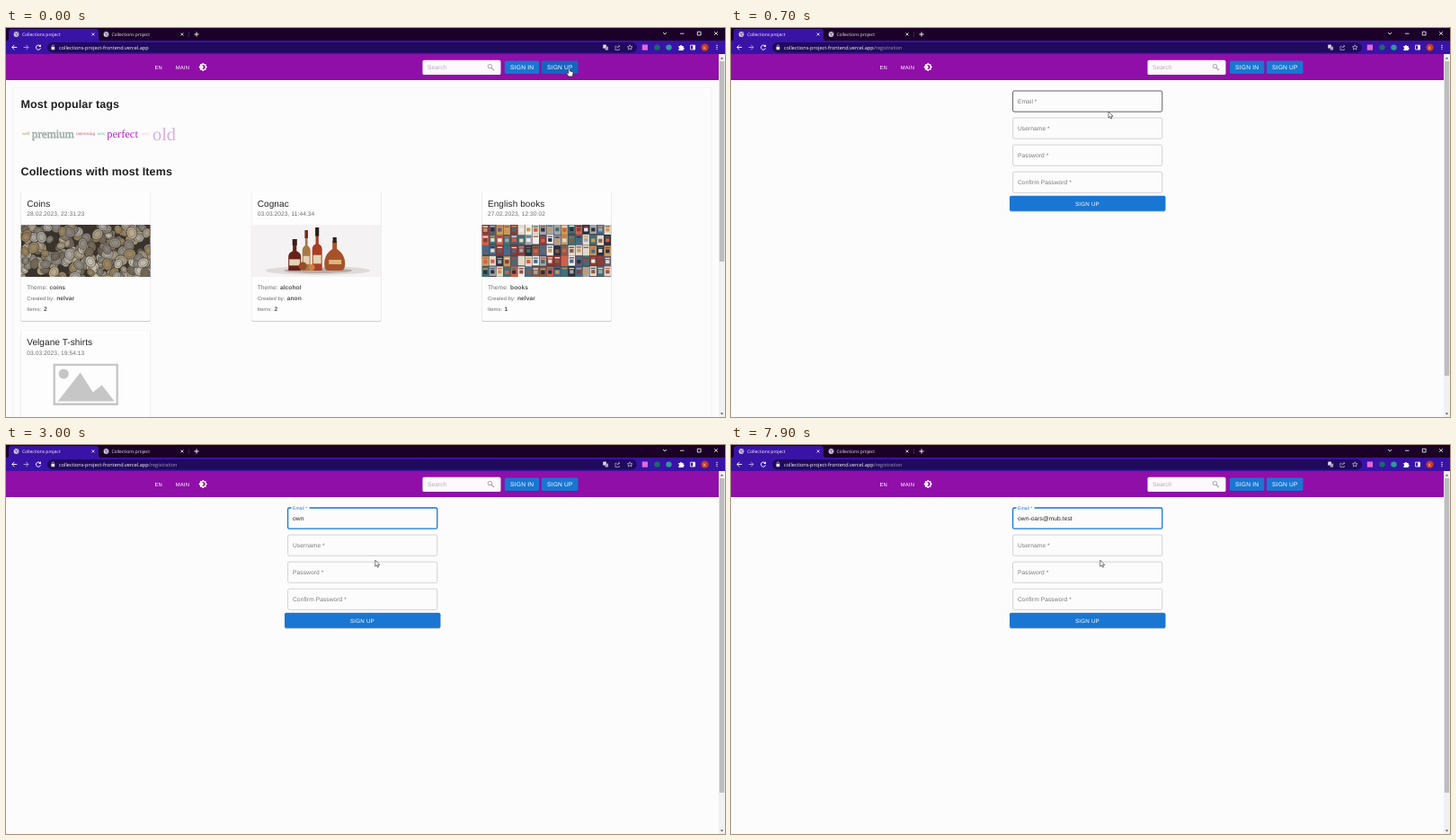
These frames come from a looping animation (800x433 px, 8000 ms). An HTML page:

```html
<!DOCTYPE html>
<html lang="en">
<head>
<meta charset="utf-8">
<title>Collections project</title>
<style>
html, body { margin: 0; width: 100%; height: 100%; overflow: hidden; background: #fdfcfd; }
svg { display: block; width: 100vw; height: 100vh; }
text { font-family: "Liberation Sans", Arial, sans-serif; white-space: pre; text-rendering: geometricPrecision; letter-spacing: .0094em; }
.ui { font-family: "Open Sans", "Noto Sans", sans-serif; letter-spacing: 0; }
.btn { letter-spacing: .0286em; fill: #fff; }
.head { font-weight: 700; fill: #1f1f1f; }
.tag { font-family: "Liberation Serif", Times, serif; letter-spacing: 0; }
.b { font-weight: 700; }
</style>
</head>
<body>
<svg id="stage" viewBox="0 0 800 433" preserveAspectRatio="none"></svg>
<script>
const LOOP = 8000, STEP = 100;
const ADDRESS = 'own-oars@mub.test';
const BLUE = '#1976d2', DARK_BLUE = '#1565c0';

let seed = 7;
const rnd = () => (seed = (seed * 16807) % 2147483647) / 2147483647;
const pick = list => list[Math.floor(rnd() * list.length)];
const times = (n, fn) => Array.from({ length: n }, (_, i) => fn(i)).join('');

const rect = (x, y, w, h, fill, more = '') =>
  `<rect x="${x}" y="${y}" width="${w}" height="${h}" fill="${fill}" ${more}/>`;
const circle = (x, y, r, fill, more = '') =>
  `<circle cx="${x}" cy="${y}" r="${r}" fill="${fill}" ${more}/>`;
const path = (d, fill, more = '') => `<path d="${d}" fill="${fill}" ${more}/>`;
const line = (d, color = '#fff', w = .8, more = '') =>
  path(d, 'none', `stroke="${color}" stroke-width="${w}" ${more}`);
const text = (s, x, y, size, fill, cls = '', more = '') =>
  `<text x="${x}" y="${y}" font-size="${size}" fill="${fill}" class="${cls}" ${more}>${s}</text>`;
const group = (id, body) => `<g id="${id}">${body}</g>`;

// Browser window
function globe(x) {
  return circle(x, 7, 2.9, '#d8d4e4') +
    line(`M${x - 2} 5.6l1.6 .4l.6 1.4l-1.2 .6M${x + .6} 4.6l.3 1l1.4 .7M${x} 9.2l1-1l1 .1`, '#3c2a6c', .7);
}

function cross(x, y, r) {
  return line(`M${x - r} ${y - r}l${2 * r} ${2 * r}m0 ${-2 * r}l${-2 * r} ${2 * r}`, '#fff', .75);
}

function browser() {
  const strip = rect(0, 0, 800, 14.5, '#1b0028') +
    path('M0 14.5Q3 14.5 3 11V4Q3 1 6 1H100Q103 1 103 4V11Q103 14.5 106 14.5Z', '#3913a6') +
    globe(11.5) + text('Collections project', 18, 9, 4.95, '#fff', 'ui') + cross(97, 7, 1.5) +
    globe(111.5) + text('Collections project', 117.5, 9, 4.95, '#f0eaf4', 'ui') + cross(196, 7, 1.5) +
    line('M203.5 4v6', '#5a4668', .5) +
    line('M209.4 7h5.2M212 4.4v5.2', '#fff', .9) +
    line('M731 5l2 2l2-2M750 6.2h4.5M769.3 4.2h3.8v3.8h-3.8z') + cross(790, 6, 1.9);
  const bar = rect(0, 14, 800, 15, '#3913a6') +
    rect(46, 16, 656, 11.4, '#200a5c', 'rx="5.7"') +
    line('M12.2 21.5H6.8m2.5-2.6l-2.6 2.6l2.6 2.6', '#fff', .9) +
    line('M19.6 21.5h5.2m-2.5-2.6l2.6 2.6l-2.6 2.6', '#b9a8e4', .9) +
    line('M38 20a2.6 2.6 0 1 0 .5 2.3', '#fff', .9) + path('M38.8 18.3v2.6h-2.6z', '#fff') +
    rect(50.4, 21, 3.8, 3.2, '#e8e4f2', 'rx=".4"') + line('M51.2 21v-1a1.1 1.1 0 0 1 2.2 0v1', '#e8e4f2', .6) +
    text('collections-project-frontend.vercel.app', 59, 23.8, 5.55, '#fff', 'ui') +
    text('/registration', 158.8, 23.8, 5.55, '#a59abf', 'ui', 'id="route"') +
    rect(664.3, 18.6, 3.6, 4, '#e4dff0') + rect(666.7, 20.6, 3.4, 4, '#a99fc4') +
    line('M679.5 20.3h-1.6v4.2h4.4v-1.6M679.8 22.6q.3-2.4 2.8-2.4m-1.2-1.4l1.5 1.4l-1.5 1.4', '#d6cfe6', .6) +
    line('M694.2 18.8l.8 1.9l2 .1l-1.5 1.3l.5 2l-1.8-1.1l-1.8 1.1l.5-2l-1.5-1.3l2-.1z', '#e8e2f4', .6) +
    rect(707.8, 18.5, 6.2, 6.2, '#e667d4') +
    circle(724.5, 21.6, 3.2, '#1a6a68') + circle(737.5, 21.6, 3.2, '#2c9a98') +
    path('M748.3 20h1.7a1 1 0 1 1 2 0h1.7v1.8a1 1 0 1 1 0 2v1.2h-5.4v-1.6a.9.9 0 1 0 0-1.8z', '#fff') +
    line('M761.6 19.2h5v4.8h-5z') + rect(764.2, 19.2, 2.5, 4.8, '#fff') +
    circle(777.6, 21.6, 4.2, '#c8391c') + text('К', 777.6, 23.5, 5, '#fff', 'ui', 'text-anchor="middle"') +
    times(3, i => circle(791, 19.4 + i * 2.1, .65, '#fff'));
  return strip + bar;
}

// Page header
function header() {
  const star = 'M20 15.31L23.31 12 20 8.69V4h-4.69L12 .69 8.69 4H4v4.69L.69 12 4 15.31V20h4.69L12 23.31 15.31 20H20z' +
    'M12 18c-.89 0-1.74-.2-2.5-.55C11.56 16.5 13 14.42 13 12s-1.44-4.5-3.5-5.45C10.26 6.2 11.11 6 12 6c3.31 0 6 2.69 6 6s-2.69 6-6 6z';
  return rect(0, 29, 793, 29, '#900fa8') +
    text('EN', 165.5, 45.8, 5.83, '#fff', 'btn') + text('MAIN', 188.8, 45.8, 5.83, '#fff', 'btn') +
    path(star, '#fff', 'fill-rule="evenodd" transform="translate(214.2 38.5) scale(.4167)"') +
    rect(463.5, 35.8, 87, 16.2, '#fdf9fd', 'rx="1.6"') +
    text('Search', 469, 45.8, 6.667, '#b4aab8') +
    circle(538.4, 42.6, 2.2, 'none', 'stroke="#9c9c9c" stroke-width=".9"') + line('M540 44.2l2.9 2.9', '#9c9c9c', 1.1) +
    rect(554.8, 37.2, 38.6, 14.4, '#4a1080', 'rx="1.7" opacity=".4"') +
    rect(554.8, 36.4, 38.6, 14.6, BLUE, 'rx="1.7"') +
    text('SIGN IN', 561.1, 45.9, 6.667, '#fff', 'btn') +
    rect(595.8, 37.2, 40.8, 14.4, '#4a1080', 'rx="1.7" opacity=".4"') +
    rect(595.8, 36.4, 40.8, 14.6, BLUE, 'rx="1.7" id="join"') +
    circle(624, 43.7, 7, '#6fa8e4', 'id="ripple" opacity="0"') +
    text('SIGN UP', 602, 45.9, 6.667, '#fff', 'btn');
}

function scrollbar() {
  return rect(793, 29, 7, 404, '#f1f1f1') + rect(793.8, 37, 5.4, 223, '#bdbdbd', 'id="thumb"') +
    path('M794.8 34.6l1.7-2l1.7 2z', '#555') + path('M794.8 428.4l1.7 2l1.7-2z', '#505050');
}

// Catalogue page
function coins() {
  const tones = ['#8f8b82', '#a89c86', '#85807a', '#b9aa8c', '#746a5a', '#c2bcae', '#9a8560', '#a8a49c'];
  return rect(0, 0, 144, 58, '#3a332c') + times(230, () => {
    const x = rnd() * 144, y = rnd() * 60, r = 4 + rnd() * 3;
    return `<g transform="translate(${x.toFixed(1)} ${y.toFixed(1)}) rotate(${Math.round(rnd() * 180)}) scale(1 .82)">` +
      circle(0, 0, r.toFixed(1), pick(tones), 'stroke="#38302a" stroke-width=".6"') +
      circle(0, 0, (r * .62).toFixed(1), 'none', 'stroke="#5c5446" stroke-width=".5"') + '</g>';
  });
}

function bottle(x, top, w, cap, drink) {
  const neck = w * .3, h = 51 - top, bulge = (w - neck) / 2;
  return path(`M${x - neck / 2} ${top}h${neck}v${h * .38}q${bulge} 2 ${bulge} 6V51h${-w}V${top + h * .38 + 6}q0-4 ${bulge}-6z`, drink) +
    rect(x - neck / 2 - .4, top, neck + .8, h * .2, cap) +
    rect(x - w / 2 + 1, 51 - h * .36, w - 2, h * .2, '#e4d2b4');
}

function bottles() {
  return rect(0, 0, 144, 58, '#f4f2f3') +
    `<ellipse cx="74" cy="51" rx="58" ry="5" fill="#dedada"/><ellipse cx="74" cy="51" rx="38" ry="3" fill="#b4acab"/>` +
    bottle(48, 16, 14, '#352018', '#6a2018') + bottle(61, 6, 9, '#752a1c', '#a87848') +
    bottle(73, 3, 11, '#28201c', '#a83e24') +
    path('M90 18h5v9q9 6 9 16q0 8-4 8h-15q-4 0-4-8q0-10 9-16z', '#a8522a') + rect(90.4, 14, 4.2, 6, '#332018') +
    rect(86, 39, 14, 5, '#dcb480') + circle(57, 46, 4.5, '#9a4a26') + circle(67, 47.5, 3.4, '#d0803c');
}

function books() {
  const tones = ['#2b2f3c', '#8c3a34', '#e2dacc', '#476a8c', '#c89a58', '#645a70', '#a2a6ae', '#d0604a', '#3d7070', '#f0eeea', '#8a5c48'];
  const cols = 18, w = 144 / cols;
  return rect(0, 0, 144, 58, '#4a434a') + times(cols * 5, i => {
    const x = i % cols * w + .2, y = Math.floor(i / cols) * 11.8 - rnd();
    return rect(x, y, w - .5, 10.4 + rnd() * 1.4, pick(tones)) + rect(x + 1, y + 1.6, w - 2.5, 1.3, pick(tones)) +
      rect(x + 1.6, y + 4, w - 3.7, 4, pick(tones));
  });
}

function card(x, y, name, date, art, theme, owner, count) {
  const row = (label, value, dy, size, gap) =>
    text(label, x + 6.5, y + dy, size, '#707070') + text(value, x + gap, y + dy, 6.667, '#555', 'b');
  return rect(x - .4, y, 144.8, 145, '#000', 'rx="1.7" opacity=".08"') +
    rect(x, y + .4, 144, 144.4, '#000', 'rx="1.7" opacity=".16"') +
    rect(x, y, 144, 144, '#fefdfe', 'rx="1.7"') +
    text(name, x + 6.5, y + 16.8, 10, '#222') + text(date, x + 6.5, y + 27, 6.667, '#707070') +
    `<svg x="${x}" y="${y + 37}" width="144" height="58" viewBox="0 0 144 58">${art}</svg>` +
    (theme ? row('Theme:', theme, 108.7, 6.667, 31.7) + row('Created by:', owner, 121, 5.83, 39.5) +
      row('Items:', count, 133.2, 5.83, 25.2) : '');
}

function placeholder() {
  return line('M37 1.2h70v44h-70z', '#c6c6c6', 2.4) + circle(47.5, 11.5, 5.6, '#c6c6c6') +
    path('M41 42L66 10L80 32L90 24L104 42Z', '#c6c6c6');
}

function catalogue() {
  const tags = [
    ['well', 18, 119.4, 5, '#a08a3c'], ['premium', 28.8, 122.3, 13, '#9fb0ac'],
    ['interesting', 78, 119.4, 5, '#d84a62'], ['new', 102, 119.4, 5, '#58b09c'],
    ['perfect', 112.2, 122.2, 12.5, '#bd22cc'], ['tasty', 150.8, 119.4, 5, '#f0c4dc'],
    ['old', 163, 124.8, 20.3, '#d8aee6']
  ];
  return rect(8, 66, 777, 380, 'none', 'stroke="#f0f0f0" stroke-width=".8" rx="1.7"') +
    text('Most popular tags', 16.5, 88.8, 12.5, '', 'head') +
    text('premium', 29.3, 122.7, 13, '#b9c4c2', 'tag') +
    tags.map(([s, x, y, size, color]) => text(s, x, y, size, color, 'tag',
      s === 'premium' ? `stroke="${color}" stroke-width=".35"` : '')).join('') +
    text('Collections with most Items', 16.5, 164.4, 12.5, '', 'head') +
    card(16.7, 182, 'Coins', '28.02.2023, 22:31:23', coins(), 'coins', 'nelvar', 2) +
    card(273.2, 182, 'Cognac', '03.03.2023, 11:44:34', bottles(), 'alcohol', 'anon', 2) +
    card(529.4, 182, 'English books', '27.02.2023, 12:30:02', books(), 'books', 'nelvar', 1) +
    card(16.7, 336.5, 'Velgane T-shirts', '03.03.2023, 19:54:13', placeholder());
}

// Registration page
const LABELS = ['Email *', 'Username *', 'Password *', 'Confirm Password *'];
const FIELD = { x: 313.6, w: 166.2, h: 23.2, top: i => 70 + i * 30.05 };

function form() {
  return LABELS.map((s, i) =>
    rect(FIELD.x, FIELD.top(i), FIELD.w, FIELD.h, 'none', `rx="1.7" id="box${i}"`) +
    (i ? text(s, 319, FIELD.top(i) + 13.9, 6.667, '#7a7a7a') : '')).join('') +
    rect(317.6, 68.5, 20, 3, '#fdfcfd', 'id="gap"') +
    text(LABELS[0], 319, 83.9, 6.667, '#7a7a7a', '', 'id="label"') +
    rect(348.2, 78, 6.4, 7, '#c6c6c6', 'id="mark"') +
    text('', 319, 83.9, 6.667, '#262626', '', 'id="value"') +
    rect(319, 78, .7, 7, '#222', 'id="caret"') +
    rect(310, 187.6, 173.4, 16.8, '#000', 'rx="1.7" opacity=".25"') +
    rect(310, 186.8, 173.4, 17, BLUE, 'rx="1.7"') +
    text('SIGN UP', 383, 197.5, 6.25, '#fff', 'btn');
}

function pointers() {
  const edge = 'stroke="#222" stroke-width=".6" stroke-linejoin="round"';
  return group('arrow', path('M0 0V7L1.6 5.6L2.7 8L3.8 7.5L2.8 5.2H5Z', '#fff', edge)) +
    group('hand', path('M-.7 .6Q0-.5 .7 .6V3.3L3.5 4Q4.3 4.3 4.1 5.2L3.5 8.8H-.6L-2.6 5.6Q-2.2 4.6-.7 5.6Z', '#fff', edge));
}

const stage = document.getElementById('stage');
stage.innerHTML = rect(0, 0, 800, 433, '#fdfcfd') + group('catalogue', catalogue()) +
  group('form', form()) + header() + scrollbar() + browser() + pointers();

const $ = id => document.getElementById(id);
const show = (id, on) => $(id).setAttribute('display', on ? 'inline' : 'none');
const set = (id, attrs) => { for (const k in attrs) $(id).setAttribute(k, attrs[k]); };

// time, x, y of the pointer tip
const MOVES = [[0, 626.6, 44.4], [100, 626.6, 44.4], [200, 603, 153.2], [400, 515, 140],
  [600, 435, 102], [800, 405, 84], [1000, 405, 86], [1200, 410.8, 128.2]];
// time, characters typed
const KEYS = [[0, 0], [2200, 1], [2300, 2], [2400, 3], [3600, 4], [3700, 5], [3800, 6], [4000, 7], [4200, 8],
  [4800, 9], [5100, 10], [6100, 11], [6300, 12], [7000, 14], [7100, 15], [7200, 16], [7400, 17]];
const CARET_OFF = [[0, 940], [1500, 2000], [3000, 3500], [5600, 6100], [6800, 7000], [7900, 8000]];
const PRESS_AT = 50, OPEN_AT = 200, FOCUS_AT = 940;

const clamp = v => Math.min(1, Math.max(0, v));
const mix = (a, b, k) => a + (b - a) * k;

function pointerAt(t) {
  const i = MOVES.findIndex(m => m[0] > t);
  if (i < 0) return MOVES[MOVES.length - 1].slice(1);
  const [a, b] = [MOVES[i - 1], MOVES[i]], k = (t - a[0]) / (b[0] - a[0]);
  return [mix(a[1], b[1], k), mix(a[2], b[2], k)];
}

function render(t) {
  const open = t >= OPEN_AT, focused = t >= FOCUS_AT;
  show('catalogue', !open);
  show('form', open);
  show('route', open);
  set('thumb', { height: open ? 350 : 223 });

  set('join', { fill: t < 300 ? DARK_BLUE : BLUE });
  const spread = clamp((t - PRESS_AT) / 150);
  set('ripple', { r: 7 * spread, opacity: .45 * clamp((600 - t) / 400) });

  const [x, y] = pointerAt(t);
  set('arrow', { transform: `translate(${x} ${y})` });
  set('hand', { transform: `translate(${x} ${y}) scale(1.08)` });
  show('arrow', open);
  show('hand', !open);

  LABELS.forEach((_, i) => {
    const top = FIELD.top(i), active = focused && !i;
    const over = x > FIELD.x && x < FIELD.x + FIELD.w && y > top && y < top + FIELD.h;
    set('box' + i, { stroke: active ? BLUE : over ? '#212121' : '#c2c2c2', 'stroke-width': active ? 1.3 : .7 });
  });

  const rise = 1 - (1 - clamp((t - FOCUS_AT) / 200)) ** 2;
  set('label', { y: mix(83.9, 71.8, rise), 'font-size': mix(6.667, 5, rise), fill: focused ? BLUE : '#7a7a7a' });
  show('gap', focused);

  const count = KEYS.filter(k => k[0] <= t).pop()[1];
  $('value').textContent = ADDRESS.slice(0, count);
  set('caret', { x: 319 + (count ? $('value').getComputedTextLength() : .2) });
  show('caret', !CARET_OFF.some(([a, b]) => t >= a && t < b));
  show('mark', t >= 4800 && t < 5100);
}

const start = performance.now();
function tick() {
  const t = (performance.now() - start) % LOOP;
  render(Math.floor(t / STEP) * STEP);
  requestAnimationFrame(tick);
}
tick();
</script>
</body>
</html>
```
